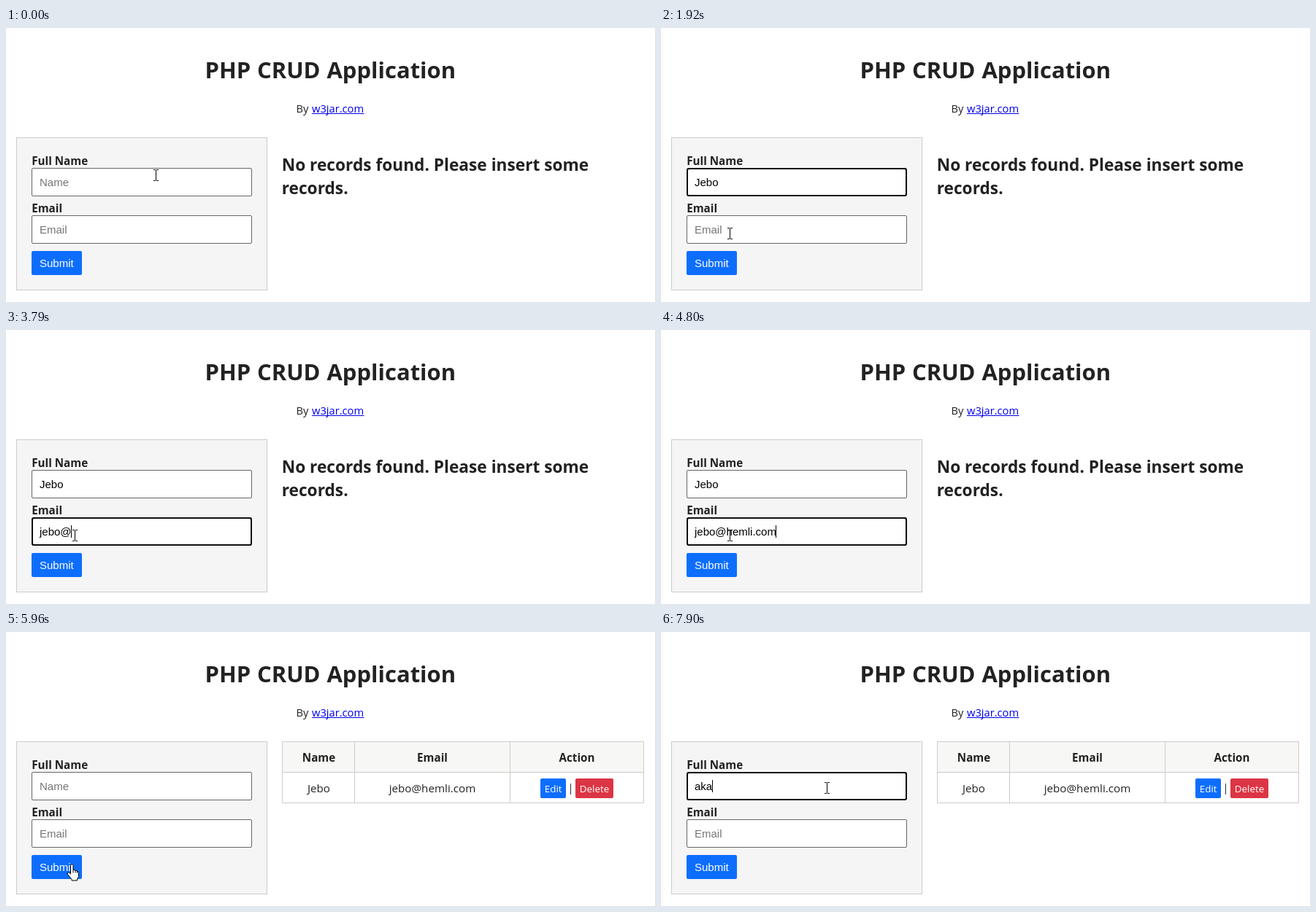
An HTML page for the animation above (8000 ms loop, 889x376 px).

```html
<!DOCTYPE html>
<html lang="en">
<head>
<meta charset="utf-8">
<title>PHP CRUD Application</title>
<style>
html, body { margin: 0; width: 100%; height: 100%; overflow: hidden; background: #fff; }
svg { display: block; width: 889px; height: 376px; }
text { font: 15.2px "Open Sans", "Noto Sans", sans-serif; fill: #222; white-space: pre; }
.mid { text-anchor: middle; }
.bold { font-weight: 700; }
.title { font-size: 31px; word-spacing: .8px; }
.notice { font-size: 22.7px; }
.by { font-size: 14.7px; }
.link { fill: #00e; }
.small { font-size: 13.4px; fill: #fff; }
.ui text { font: 15px "Liberation Sans", Arial, sans-serif; fill: #000; }
.ui .hint { fill: #757575; }
.ui .on-blue { fill: #fff; }
.line { fill: none; stroke: #ccc; }
.box { fill: #fff; stroke: #666; }
.focus { fill: none; stroke: #101010; stroke-width: 2; }
.blue { fill: #0d6efd; }
.red { fill: #dc3545; }
</style>
</head>
<body>
<svg viewBox="0 0 889 376">
  <text class="title bold mid" x="444.3" y="69">PHP CRUD Application</text>
  <text class="by" x="397.5" y="116">By</text>
  <text class="by link" x="419" y="116">w3jar.com</text>
  <path d="M419 117.5H490.5" stroke="#00e"/>

  <rect x="14.5" y="150.5" width="343" height="209" fill="#f5f5f5" stroke="#ccc"/>
  <text class="bold" x="35.2" y="188">Full Name</text>
  <text class="bold" x="35.2" y="253">Email</text>
  <g class="ui">
    <g id="name" transform="translate(35 192)">
      <rect class="box" x=".5" y=".5" width="301" height="38" rx="1.5"/>
      <rect class="focus" x="1" y="1" width="300" height="37" rx="2.5"/>
      <text class="hint" x="11" y="25">Name</text>
      <text class="value" x="11" y="25"></text>
      <rect class="caret" y="11" width="1" height="17"/>
    </g>
    <g id="email" transform="translate(35 257)">
      <rect class="box" x=".5" y=".5" width="301" height="38" rx="1.5"/>
      <rect class="focus" x="1" y="1" width="300" height="37" rx="2.5"/>
      <text class="hint" x="11" y="25">Email</text>
      <text class="value" x="11" y="25"></text>
      <rect class="caret" y="11" width="1" height="17"/>
    </g>
    <rect class="blue" x="35" y="306" width="69" height="33" rx="2"/>
    <text class="on-blue" x="46" y="328">Submit</text>
  </g>

  <g id="empty">
    <text class="notice bold" x="377.7" y="196">No records found. Please insert some</text>
    <text class="notice bold" x="377.7" y="228">records.</text>
  </g>

  <g id="records">
    <rect x="378" y="150" width="496" height="42" fill="#f7f7f5"/>
    <path class="line" d="M378.5 150.5H873.5V234.5H378.5ZM378.5 192.5H873.5M477.5 150.5V234.5M690.5 150.5V234.5"/>
    <g class="mid">
      <text class="bold" x="428.5" y="178">Name</text>
      <text class="bold" x="584" y="178">Email</text>
      <text class="bold" x="782" y="178">Action</text>
      <text x="428.5" y="220">Jebo</text>
      <text x="584" y="220">jebo@hemli.com</text>
      <rect class="blue" x="732" y="201" width="35" height="27" rx="2"/>
      <text class="small" x="749.7" y="220">Edit</text>
      <path d="M773.5 208V223" stroke="#234"/>
      <rect class="red" x="780" y="201" width="52" height="27" rx="2"/>
      <text class="small" x="806" y="220">Delete</text>
    </g>
  </g>

  <g id="pointer">
    <g id="beam" fill="none" stroke="#000">
      <path d="M-3-7.5H0M1-7.5H4M.5-7V7M-3 7.5H0M1 7.5H4"/>
    </g>
    <g id="hand" transform="translate(-6.5 -1)" fill="#fff" stroke="#000" stroke-linejoin="round">
      <path d="M5 14V2.5a1.75 1.75 0 0 1 3.5 0V8.5q2.6-1 3 1q2.3-.6 2.5 1.2q2-.3 2 1.6V16q0 3-2 5v2H6.5v-1.5L1 14.5q-1-2 .8-2.6 1.4-.2 3.2 2.1Z"/>
      <path d="M8.5 8.5v4M11.5 9.5v3M14 10.7v2" fill="none"/>
    </g>
  </g>
</svg>
<script>
const LOOP = 8000;
const $ = id => document.getElementById(id);

// One entry per key press, each adding one character after the prefix.
const type = (word, times, prefix = '') =>
  times.map((t, i) => [t, prefix + word.slice(0, i + 1)]);

// Every track is a list of [time, ...value] that holds until the next entry.
const tracks = {
  pointer: [
    [0, 'beam', 205, 202], [70, 'beam', 196, 197], [150, 'beam', 180, 193],
    [230, 'beam', 150, 197], [310, 'beam', 120, 207], [390, 'beam', 102, 212],
    [1620, 'beam', 101, 222], [1690, 'beam', 99, 240], [1770, 'beam', 97, 258],
    [1850, 'beam', 95, 273], [1920, 'beam', 94, 282],
    [5100, 'beam', 94, 287], [5180, 'hand', 91, 309], [5270, 'hand', 90, 315],
    [5350, 'hand', 90, 319],
    [6340, 'hand', 97, 311], [6420, 'beam', 128, 286], [6500, 'beam', 162, 262],
    [6570, 'beam', 196, 238], [6650, 'beam', 218, 221], [6730, 'beam', 227, 214]
  ],
  name: [
    [0, ''], ...type('Jebo', [840, 990, 1160, 1310]),
    [5960, ''], ...type('aka', [7570, 7720, 7900])
  ],
  email: [
    [0, ''], ...type('jebo2', [2700, 2850, 2970, 3120, 3320]),
    [3790, 'jebo@'],
    ...type('hemli', [4020, 4130, 4240, 4350, 4460], 'jebo@'),
    [4570, 'jebo@hemli.c'], [4690, 'jebo@hemli.co'], [4800, 'jebo@hemli.com'],
    [5960, '']
  ],
  focus: [[0, ''], [540, 'name'], [2230, 'email'], [5810, ''], [7040, 'name']],
  caret: [[0, false], [540, true], [1770, false], [2230, true], [5180, false], [7040, true]],
  saved: [[0, false], [5960, true]]
};

const at = (track, t) => tracks[track].findLast(step => step[0] <= t).slice(1);
const show = (el, on) => el.setAttribute('visibility', on ? 'visible' : 'hidden');

function drawField(id, t) {
  const part = cls => $(id).querySelector('.' + cls);
  const value = part('value');
  const [text] = at(id, t);
  const focused = at('focus', t)[0] === id;
  if (value.textContent !== text) value.textContent = text;
  show(part('hint'), !text);
  show(part('focus'), focused);
  show(part('caret'), focused && at('caret', t)[0]);
  part('caret').setAttribute('x', Math.floor(11 + (text ? value.getComputedTextLength() : 0)));
}

function draw(now) {
  const t = now % LOOP;
  const [shape, x, y] = at('pointer', t);
  const [saved] = at('saved', t);
  drawField('name', t);
  drawField('email', t);
  show($('empty'), !saved);
  show($('records'), saved);
  show($('beam'), shape === 'beam');
  show($('hand'), shape === 'hand');
  $('pointer').setAttribute('transform', `translate(${x} ${y})`);
  requestAnimationFrame(draw);
}
draw(performance.now());
</script>
</body>
</html>
```
